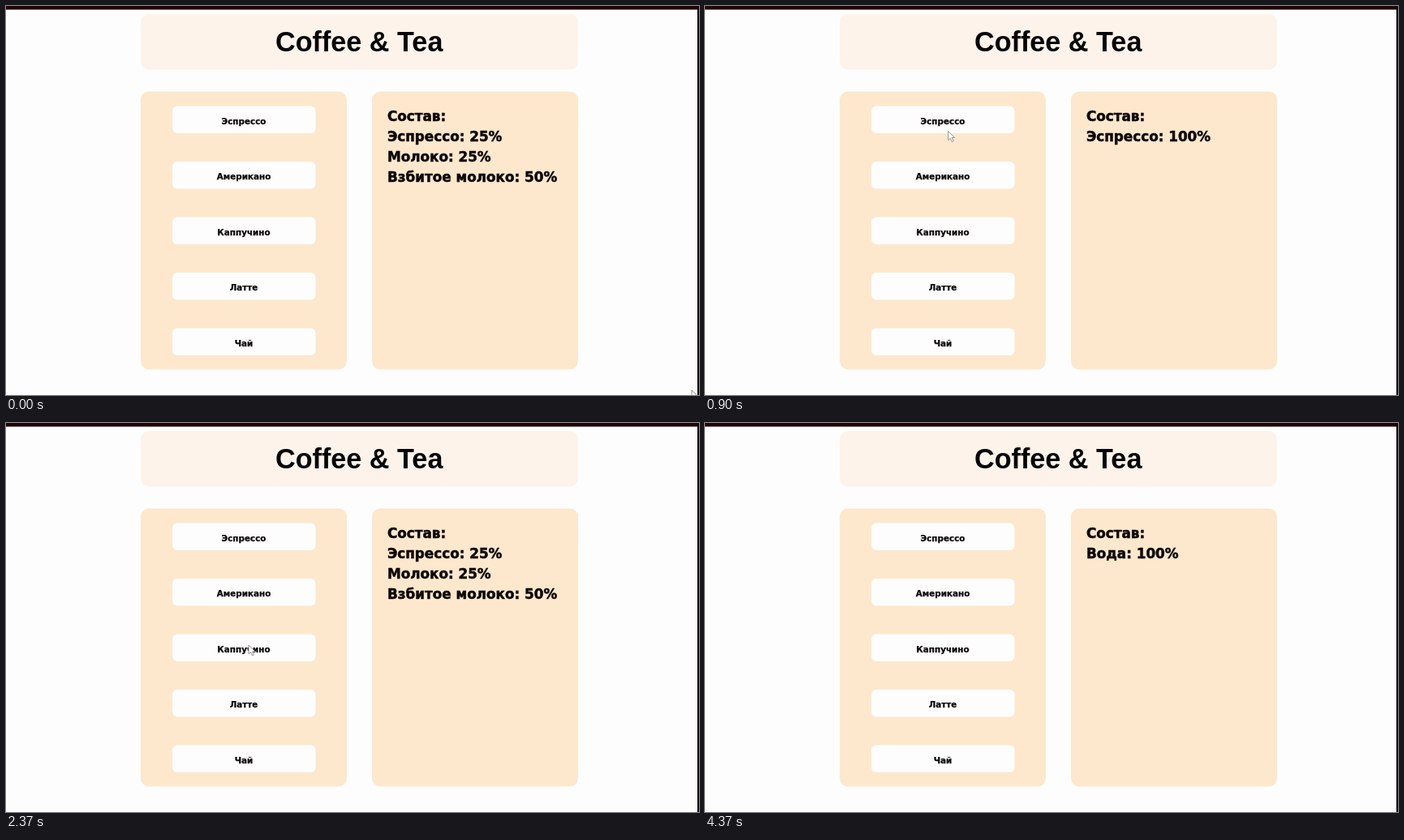
An HTML page that plays this animation: 854x480 px, repeating every 4400 ms.

```html
<!DOCTYPE html>
<html lang="ru">
<head>
<meta charset="utf-8">
<title>Coffee &amp; Tea</title>
<style>
  html, body { margin: 0; width: 100%; height: 100%; overflow: hidden; background: #fdfdfd; }
  svg { display: block; width: 854px; height: 480px; }
  text { fill: #0c0705; font: bold 16.8px "DejaVu Sans", sans-serif; }
  .title { fill: #050505; font: bold 34.2px "Liberation Sans", Arial, sans-serif; text-anchor: middle; }
  .label { font-size: 10.4px; text-anchor: middle; }
  #recipe { stroke: #0c0705; stroke-width: .5; }
  #menu text { stroke: #0c0705; stroke-width: .25; }
  .panel { fill: #fde8cd; }
  .button { fill: #fdfdfd; }
</style>
</head>
<body>
<svg id="stage" viewBox="0 0 854 480">
  <rect width="854" height="480" fill="#fdfdfd"/>
  <rect width="854" height="4.5" fill="#210008"/>
  <rect x="852" width="2" height="480" fill="#100006"/>
  <rect x="166" y="10" width="539" height="68.5" rx="10" fill="#fdf3eb"/>
  <text class="title" x="435.2" y="56">Coffee &amp; Tea</text>
  <rect class="panel" x="166" y="105.5" width="254" height="343" rx="10"/>
  <rect class="panel" x="451" y="105.5" width="254" height="343" rx="10"/>
  <g id="menu"></g>
  <g id="recipe"></g>
  <path id="cursor" d="M0 0V11.2L2.6 8.8L4.6 13L6.5 12.1L4.6 8.1H8Z"
        fill="#fdfdfd" stroke="#8c8884" stroke-width=".9" stroke-linejoin="round"/>
</svg>
<script>
const LOOP = 4400;
const CURSOR_GONE = 4230;

const drinks = ['Эспрессо', 'Американо', 'Каппучино', 'Латте', 'Чай'];

const cappuccino = ['Эспрессо: 25%', 'Молоко: 25%', 'Взбитое молоко: 50%'];

// Click time and the recipe it brings up
const recipes = [
  [0, cappuccino],
  [750, ['Эспрессо: 100%']],
  [1490, ['Эспрессо: 50%', 'Вода: 50%']],
  [2280, cappuccino],
  [3130, ['Эспрессо: 25%', 'Молоко: 50%', 'Взбитое молоко: 25%']],
  [3770, ['Вода: 100%']]
];

// Pointer stops: arrival, departure, x, y
const stops = [
  [0, 30, 845, 474],
  [530, 820, 300, 150.5],
  [1340, 1560, 295, 210.5],
  [2220, 2450, 299, 274],
  [2980, 3200, 301, 338],
  [3570, 3880, 307, 417.5],
  [CURSOR_GONE, LOOP, 308, 447]
];

const $ = id => document.getElementById(id);

function add(parent, tag, attrs, text = '') {
  const el = document.createElementNS('http://www.w3.org/2000/svg', tag);
  for (const key in attrs) el.setAttribute(key, attrs[key]);
  el.textContent = text;
  parent.append(el);
  return el;
}

drinks.forEach((name, i) => {
  const y = 123.4 + i * 68.5;
  add($('menu'), 'rect', { class: 'button', x: 205, y, width: 176.5, height: 33.6, rx: 6 });
  add($('menu'), 'text', { class: 'label', x: 293, y: y + 22.3 }, name);
});

const lines = [0, 1, 2, 3].map(i =>
  add($('recipe'), 'text', { x: 470, y: 142.2 + i * 24.8 }));
lines[0].textContent = 'Состав:';

const ease = p => p * p * (3 - 2 * p);

function pointerAt(t) {
  const i = stops.findIndex(s => t < s[1]);
  const [arrive, , x, y] = stops[i];
  if (t >= arrive) return [x, y];
  const [, leave, x0, y0] = stops[i - 1];
  const p = ease((t - leave) / (arrive - leave));
  return [x0 + (x - x0) * p, y0 + (y - y0) * p];
}

let shown;
function draw(t) {
  const recipe = recipes.filter(r => r[0] <= t).pop()[1];
  if (recipe !== shown) {
    lines.slice(1).forEach((line, i) => { line.textContent = recipe[i] || ''; });
    shown = recipe;
  }
  const cursor = $('cursor');
  cursor.setAttribute('transform', `translate(${pointerAt(t)})`);
  cursor.setAttribute('visibility', t < CURSOR_GONE ? 'visible' : 'hidden');
}

const start = performance.now();
function tick(now) {
  draw(Math.max(0, now - start) % LOOP);
  requestAnimationFrame(tick);
}
draw(0);
requestAnimationFrame(tick);
</script>
</body>
</html>
```
